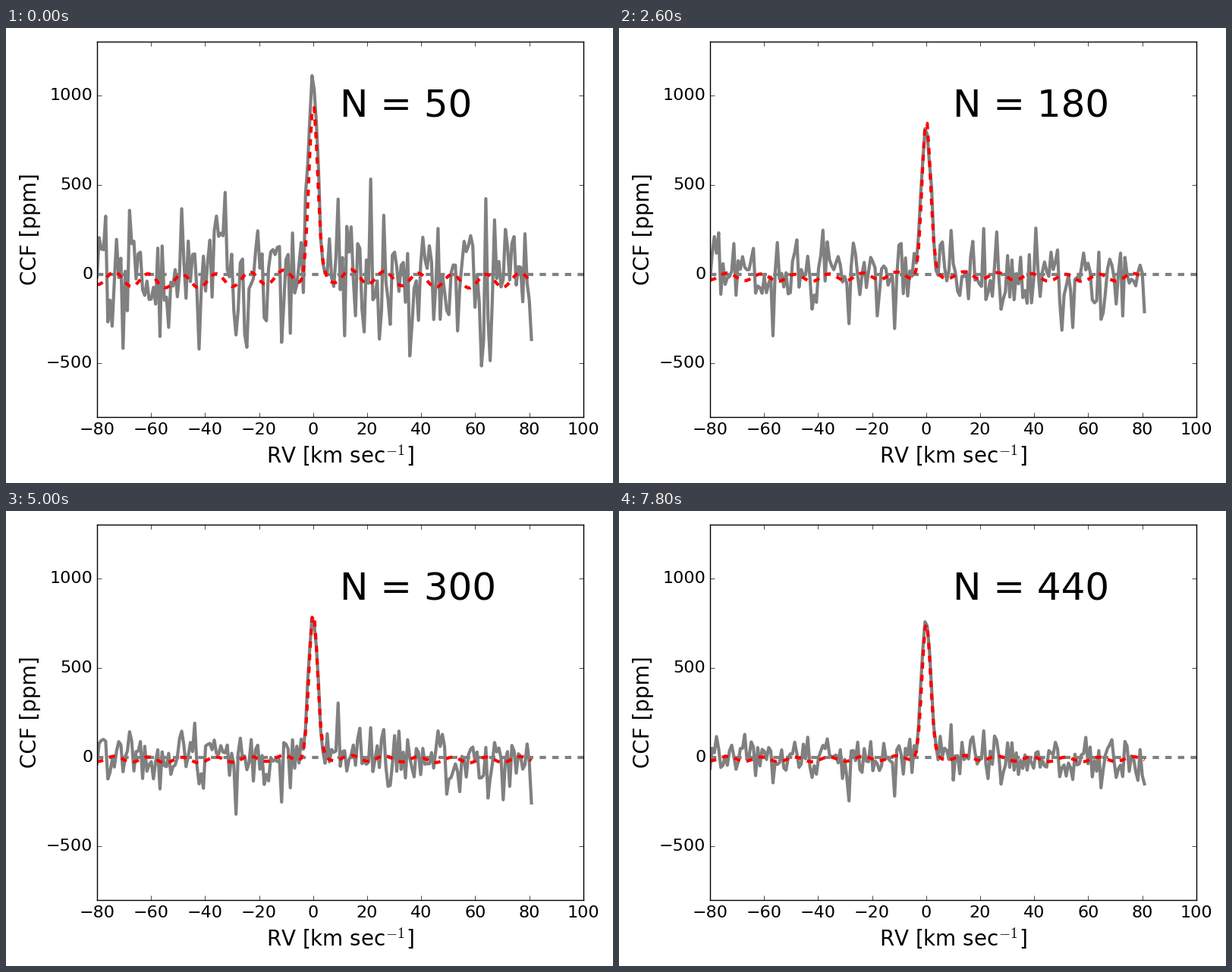
Write a matplotlib script that moves like this. It is 800 by 600 pixels and loops after 8 s.

```python
import matplotlib.pyplot as plt
import numpy as np
from matplotlib.animation import FuncAnimation

FRAMES, STEP_MS = 40, 200
N_START, N_STEP = 50, 10
N_END = N_START + N_STEP * (FRAMES - 1)
NOISE = 1480  # scatter of a single spectrum, ppm
GRAY = "#808080"

plt.rcParams.update({
    "font.family": "DejaVu Sans",
    "mathtext.fontset": "cm",
    "text.kerning_factor": 6,
    "axes.linewidth": 1,
    "axes.labelpad": 5,
    "xtick.direction": "in", "ytick.direction": "in",
    "xtick.top": True, "ytick.right": True,
    "xtick.major.size": 4, "ytick.major.size": 4,
    "xtick.major.width": 0.5, "ytick.major.width": 0.5,
    "xtick.major.pad": 5, "ytick.major.pad": 4,
    "ytick.alignment": "center",
    "lines.scale_dashes": False,
    "lines.dashed_pattern": [6, 6],
    "lines.solid_joinstyle": "round",
})

rv = -80 + 0.804 * np.arange(201)


def bell(center, width):
    return np.exp(-0.5 * ((rv - center) / width) ** 2)


def wave(peak, period):
    return np.cos(2 * np.pi * (rv - peak) / period)


def running_noise():
    """Mean noise of the first N spectra, one row per count."""
    rng = np.random.default_rng(12)
    added = rng.normal(0, NOISE * np.sqrt(N_STEP), (FRAMES, rv.size))
    added[0] *= np.sqrt(N_START / N_STEP)
    counts = N_START + N_STEP * np.arange(FRAMES)
    return added.cumsum(axis=0) / counts[:, None]


noise = running_noise()


def measured(k, n):
    fade = N_START * (N_END - n) / ((N_END - N_START) * n)
    height = 775 + 370 * fade
    calm = 1 - 0.85 * bell(0, 2.2)
    return height * bell(-0.05, 1.75) + calm * (noise[k] - 15)


def model(n):
    ripple = -25 + 38 * wave(-73.5, 12.5) + 15 * wave(4, 105)
    height = 955 - 45 * np.log(n / N_START) - 0.25 * (n - N_START)
    peak = bell(0.05, 1.55)
    return height * peak + (1 - peak) * ripple * np.sqrt(N_START / n)


fig = plt.figure(figsize=(8, 6), dpi=100, facecolor="white")
ax = fig.add_axes([119.9 / 800, 86.9 / 600, 641 / 800, 495 / 600])
ax.set(xlim=(-80, 100), ylim=(-800, 1300),
       xticks=range(-80, 101, 20), yticks=range(-500, 1001, 500))
ax.tick_params(labelsize=16)
ax.set_xlabel(r"RV [km sec$^{-1}$]", size=20)
ax.set_ylabel("CCF [ppm]", size=20)

ax.axhline(0, color=GRAY, lw=3, ls="--")
noisy, = ax.plot([], [], color=GRAY, lw=3)
smooth, = ax.plot([], [], color="red", lw=3, ls="--")
label = ax.text(10, 878, "", size=36)


def draw(k):
    n = N_START + N_STEP * k
    noisy.set_data(rv, measured(k, n))
    smooth.set_data(rv, model(n))
    label.set_text(f"N = {n}")
    return noisy, smooth, label


anim = FuncAnimation(fig, draw, frames=FRAMES, interval=STEP_MS,
                     repeat=True, repeat_delay=0)
plt.show()
```
